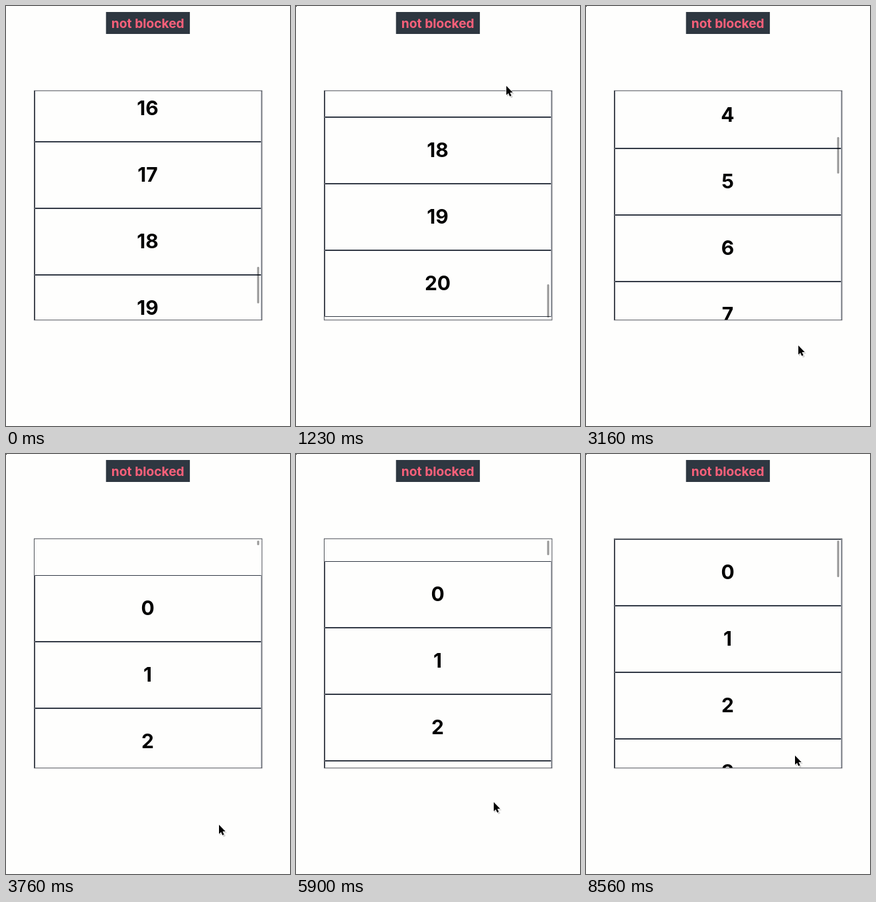
Animation, 428 px wide and 631 px high, one loop 8730 ms. Source, as an HTML page:

```html
<!DOCTYPE html>
<html lang="en">
<head>
<meta charset="utf-8">
<title>Scroll blocking</title>
<style>
  html, body { margin: 0; width: 100%; height: 100%; overflow: hidden; background: #fefefd; }
  svg { display: block; width: 428px; height: 631px; }
  text { font-family: Inter, "Liberation Sans", sans-serif; font-weight: 700; text-anchor: middle; }
  .num { font-size: 30px; fill: #000; }
  #label { font-size: 19.2px; }
</style>
</head>
<body>
<svg viewBox="0 0 428 631" xmlns="http://www.w3.org/2000/svg">
  <defs>
    <clipPath id="view"><rect x="43" y="127" width="343" height="345"/></clipPath>
  </defs>
  <rect width="428" height="631" fill="#fefefd"/>
  <rect id="dot" width="1" height="1"/>
  <rect id="badge" y="9" height="33" fill="#2e3741"/>
  <text id="label" x="213.8" y="33"></text>
  <g clip-path="url(#view)"><g id="list"></g></g>
  <rect x="42.5" y="127.3" width="343.3" height="344.5" fill="none" stroke="#50535a"/>
  <rect id="thumb" x="378.5" width="3" rx="1.5" fill="#000" fill-opacity=".4"/>
  <g id="cursor">
    <path d="M1 2V16l3.5-2.8 2.4 5 3-1.2-2.2-4.7h4.3z" fill="#000" opacity=".18"/>
    <path d="M0 0V13.8l3.1-2.9 2.1 4.8 2.3-1-2-4.6h4.2z" fill="#000"
      stroke="#fff" stroke-width="1.2" stroke-linejoin="round" paint-order="stroke"/>
  </g>
</svg>
<script>
const LOOP = 8730, STEP = 1000 / 15;
const ROWS = 21, ROW_H = 100, TOP = 128, VIEW = 344;
const MAX = ROWS * ROW_H - VIEW;

// List events: end reached, flick, top reached, grab, release
const HIT_END = 115, FLICK = 2650, FLICK_END = 2787, HIT_START = 3500;
const GRAB = 4500, RELEASE = 5600;
const FLICK_Y = 224, FLICK_D = 285, GRAB_Y = 235;

// Pointer stops: time, x, y
const STOPS = [
  [430, 322, -30], [630, 325, 28], [1700, 316, 128], [2363, 316, 128],
  [FLICK, 314, FLICK_Y], [FLICK_END, 319, FLICK_Y + FLICK_D], [3560, 320, 510],
  [3763, 321, 557], [3960, 320, 640], [GRAB, 310, GRAB_Y], [RELEASE, 301, 509],
  [5900, 298, 523], [6360, 306, 432], [8560, 315, 453]
];

const $ = id => document.getElementById(id);
const NS = "http://www.w3.org/2000/svg";
const clamp = (v, lo, hi) => Math.max(lo, Math.min(hi, v));

function add(tag, attrs) {
  const el = document.createElementNS(NS, tag);
  for (const k in attrs) el.setAttribute(k, attrs[k]);
  return $("list").appendChild(el);
}

for (let i = 0; i < ROWS; i++) {
  const y = i * ROW_H;
  add("path", { d: `M384.5 ${y + .5}H43.5V${y + ROW_H - .5}H384.5`, fill: "none", stroke: "#343b47" });
  add("path", { d: `M384.8 ${y}v${ROW_H}`, stroke: "#7d8492" });
  add("text", { class: "num", x: 213.5, y: y + 60 }).textContent = i;
}

function pointer(t) {
  const next = STOPS.findIndex(stop => stop[0] > t);
  if (next === 0) return STOPS[0].slice(1);
  if (next < 0) return STOPS[STOPS.length - 1].slice(1);
  const [t0, x0, y0] = STOPS[next - 1], [t1, x1, y1] = STOPS[next];
  const k = 1 - (1 - (t - t0) / (t1 - t0)) ** 3;
  return [x0 + (x1 - x0) * k, y0 + (y1 - y0) * k];
}

// Critically damped overshoot after hitting an edge at speed v (px/s)
const bounce = (ms, v) => v * ms / 1000 * Math.exp(-5.3 * ms / 1000);
const rubber = d => d * VIEW * .55 / (VIEW + .55 * d);

function scroll(t, y) {
  if (t < HIT_END) return 1624 + (MAX - 1624) * Math.max(0, t - 30) / (HIT_END - 30);
  if (t < FLICK) return MAX + bounce(t - HIT_END, 1580);
  if (t < FLICK_END) return MAX - (y - FLICK_Y);
  if (t < HIT_START) {
    const decay = ms => Math.exp(-ms / 435), end = decay(HIT_START - FLICK_END);
    return (MAX - FLICK_D) * (decay(t - FLICK_END) - end) / (1 - end);
  }
  const rest = bounce(t - HIT_START, 824);
  if (t < GRAB) return -rest;
  if (t < RELEASE) return -Math.max(rest, rubber(y - GRAB_Y));
  const k = 8 * (t - RELEASE) / 1000;
  return -rubber(509 - GRAB_Y) * (1 + k) * Math.exp(-k);
}

function draw(time) {
  const now = time % LOOP;
  const t = now < 30 ? 0 : 30 + Math.floor((now - 20) / STEP) * STEP;
  const [x, y] = pointer(t);
  const s = Math.round(scroll(t, y));
  const inside = clamp(s, 0, MAX);
  const size = Math.max(7, 55 - Math.abs(s - inside));
  const blocked = t >= GRAB + 90 && t < RELEASE;
  const w = blocked ? 91 : 126.4;

  $("list").setAttribute("transform", `translate(0 ${TOP - s})`);
  $("thumb").setAttribute("height", size);
  $("thumb").setAttribute("y", s > MAX ? 468 - size : 130 + 283 * inside / MAX);
  $("cursor").setAttribute("transform", `translate(${Math.round(x)} ${Math.round(y)})`);
  $("badge").setAttribute("x", 213.9 - w / 2);
  $("badge").setAttribute("width", w);
  $("label").textContent = blocked ? "blocked" : "not blocked";
  $("label").setAttribute("fill", blocked ? "#66f255" : "#fb607a");
  $("dot").setAttribute("opacity", t < 30 ? 0 : 1);
}

const start = performance.now();
function frame() {
  draw(performance.now() - start);
  requestAnimationFrame(frame);
}
frame();
</script>
</body>
</html>
```
